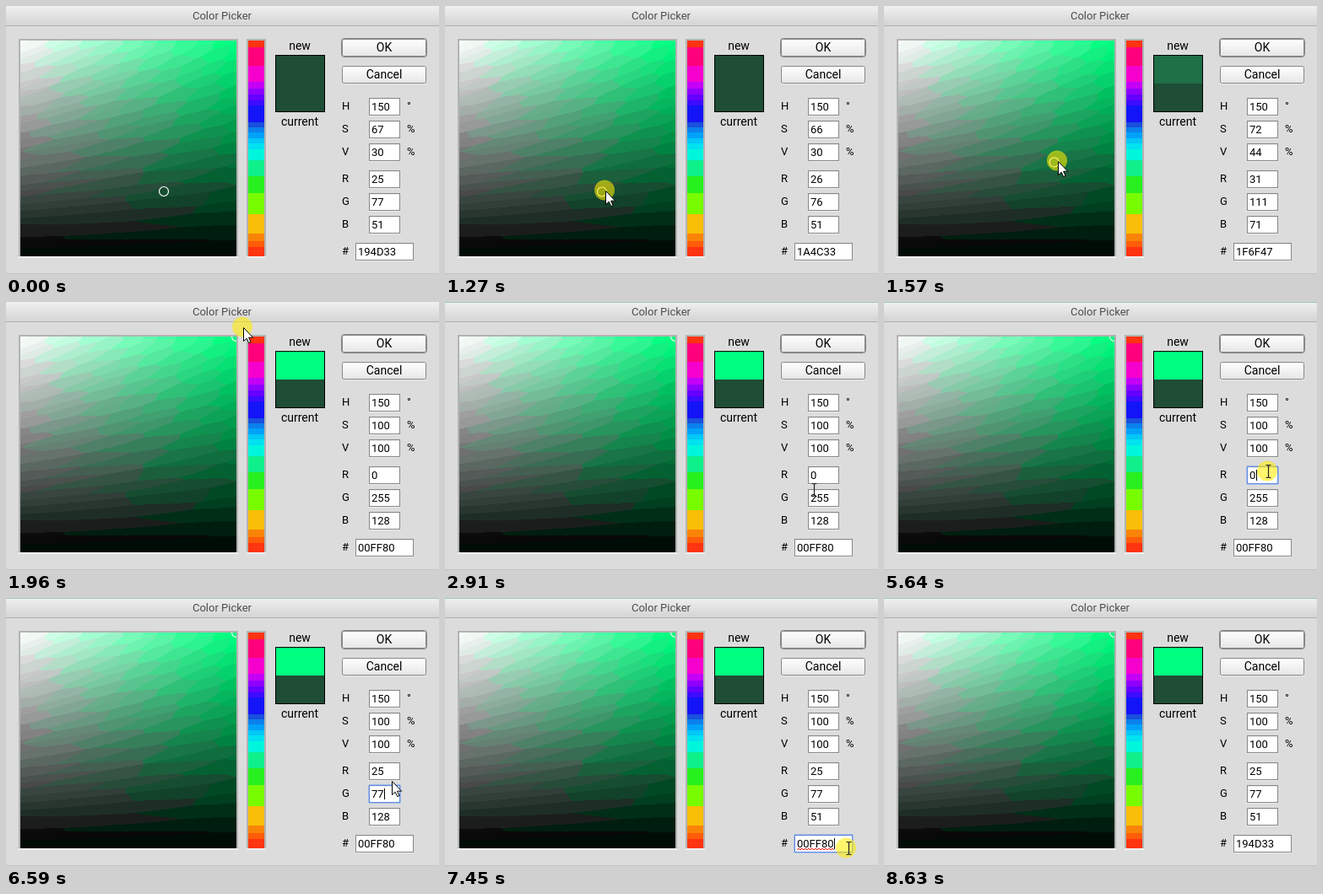
Animation, 513 px wide and 318 px high, one loop 9.48 s. Source, as an HTML page with a canvas:

```html
<!DOCTYPE html>
<html lang="en">
<head>
<meta charset="utf-8">
<title>Color Picker</title>
<style>
  html, body { margin: 0; width: 100%; height: 100%; overflow: hidden; background: #dcdcdc; }
  canvas { position: absolute; left: 17px; top: 41px; }
  svg { position: absolute; left: 0; top: 0; font: 13px Roboto, Arial, sans-serif; }
  text { white-space: pre; }
</style>
</head>
<body>
<canvas id="shade" width="256" height="256"></canvas>
<svg id="stage" width="513" height="318" viewBox="0 0 513 318">
  <defs>
    <linearGradient id="head" x2="0" y2="1"><stop stop-color="#f0f0f0"/><stop offset="1" stop-color="#d4d4d4"/></linearGradient>
    <linearGradient id="button" x2="0" y2="1"><stop stop-color="#fff"/><stop offset="1" stop-color="#e6e6e6"/></linearGradient>
    <clipPath id="area"><rect x="17" y="41" width="256" height="256"/></clipPath>
  </defs>
</svg>
<script>
const LOOP = 9480, TICK = 78.5;
const stage = document.getElementById('stage');

function add(tag, attrs, content) {
  const el = document.createElementNS('http://www.w3.org/2000/svg', tag);
  for (const key in attrs) el.setAttribute(key, attrs[key]);
  if (content) el.textContent = content;
  return stage.appendChild(el);
}
const set = (el, attrs) => { for (const key in attrs) el.setAttribute(key, attrs[key]); };
const show = (el, on) => el.setAttribute('visibility', on ? 'visible' : 'hidden');
const box = (x, y, width, height, fill, more) => add('rect', { x, y, width, height, fill, ...more });
const label = (x, y, content, more) => add('text', { x, y, ...more }, content);
const clamp = (v, lo, hi) => Math.max(lo, Math.min(hi, v));

// Hue 150 at saturation s and value v
const greenShade = (s, v) => [v * (1 - s), v, v * (1 - s / 2)].map(c => Math.round(c * 255));

// The shade area, posterised into irregular cells stretched along equal brightness
function paintShades() {
  const ctx = document.getElementById('shade').getContext('2d');
  const image = ctx.createImageData(256, 256);
  const noise = (i, j, k) => {
    const n = Math.sin(i * 127.1 + j * 311.7 + k * 74.7) * 43758.5453;
    return n - Math.floor(n);
  };
  const stepC = 0.16, stepL = 0.034;
  for (let y = 0; y < 256; y++) for (let x = 0; x < 256; x++) {
    const s = x / 255, v = 1 - y / 255;
    const c = v * s / stepC, l = v * (1 - 0.36 * s) / stepL;
    let best = Infinity, bestC, bestL;
    for (let j = Math.floor(l) - 1; j <= l + 1; j++) for (let i = Math.floor(c) - 2; i <= c + 1; i++) {
      const pc = i + 0.5 + (j & 1) / 2 + (noise(i, j, 1) - 0.5) * 0.7;
      const pl = j + 0.5 + (noise(i, j, 2) - 0.5) * 0.7;
      const d = (pc - c) ** 2 + (pl - l) ** 2;
      if (d < best) { best = d; bestC = pc; bestL = pl; }
    }
    const cellV = clamp(bestL * stepL + 0.36 * bestC * stepC, 0, 1);
    const cellS = cellV ? clamp(bestC * stepC / cellV, 0, 1) : 0;
    image.data.set([...greenShade(cellS, cellV), 255], (y * 256 + x) * 4);
  }
  ctx.putImageData(image, 0, 0);
}
paintShades();

// Window
const topEdge = box(0, 0, 513, 1, '#9cc7bd');
box(0, 0, 513, 23, 'url(#head)');
box(0, 23, 513, 1, '#b1b1b1');
stage.appendChild(topEdge);
box(0, 317, 513, 1, '#c4c4c4');
label(256, 16, 'Color Picker', { 'text-anchor': 'middle', fill: '#4d4d4d' });

function frame(x, width) {
  box(x + 1, 40, width - 2, 258, 'none', { stroke: '#b3b3b3', 'stroke-width': 2 });
  box(x, 297, width, 2, '#f0f0f0');
}
frame(15, 260);
frame(285, 23);

// Hue bands: bottom edge and colour
const hues = [
  [49, '#ff3411'], [71, '#ff007c'], [90, '#f600ce'], [98, '#c400f8'], [105, '#9000ff'],
  [112, '#6400ff'], [118, '#3c0cff'], [138, '#1414f8'], [144, '#1a50dc'], [150, '#0a80ee'],
  [157, '#00a2f8'], [163, '#00c8f8'], [170, '#00e2f0'], [183, '#00f6dc'], [202, '#10f08a'],
  [222, '#28f01e'], [247, '#78fc00'], [270, '#f8be08'], [279, '#f88408'], [286, '#ff5c0a'], [297, '#ff3411']
];
hues.reduce((y, [end, fill]) => (box(287, y, 19, end - y, fill), end), 41);

// Swatches and buttons
const middle = { 'text-anchor': 'middle', 'font-size': 14 };
label(348, 52, 'new', middle);
label(348, 142, 'current', middle);
const CURRENT = '#1f4d35';
const fresh = box(319, 58, 58, 34, CURRENT);
box(319, 92, 58, 34, CURRENT);
box(319.5, 58.5, 58, 67, 'none', { stroke: '#000' });

function button(y, content, active) {
  if (active) box(397.5, y - 1, 101, 22, 'none', { stroke: '#878787', rx: 3 });
  else box(398, y + 20.5, 100, 1, '#eaeaea');
  box(398.5, y, 99, 20, 'url(#button)', { stroke: '#878787', rx: 2 });
  label(448, y + 14.5, content, middle);
}
button(39.5, 'OK', true);
button(71.5, 'Cancel');

// Input fields
const fields = {};
function field(name, cy, unit, x = 430, width = 37) {
  const top = cy - 10, base = cy + 4.5;
  label(398, base - 1, name);
  if (unit) label(475, base - 1, unit);
  box(x, top + 20.5, width, 1, '#ececec');
  const glow = box(x - 0.5, top - 1, width + 1, 22, 'none', { stroke: '#7fa4ee', 'stroke-opacity': 0.6, rx: 1.5 });
  const rim = box(x + 0.5, top, width - 1, 20, '#fff', { stroke: '#888' });
  box(x + 1, top + 0.5, width - 2, 1, '#eee');
  const text = label(x + 3, base, '');
  const caret = box(0, cy - 6.5, 1, 13, '#000');
  fields[name] = { x, width, top, glow, rim, text, caret };
}
field('H', 119.5, '°');
field('S', 146.5, '%');
field('V', 173.5, '%');
field('R', 205.5);
field('G', 232.5);
field('B', 259.5);
field('#', 291.5, '', 414, 69);

const wave = add('path', {
  d: 'M417 299' + 'l2 -2l2 2'.repeat(11), fill: 'none', stroke: '#f02020'
});

const marker = add('circle', { r: 5.5, fill: 'none', stroke: '#fff', 'stroke-width': 1.2, 'clip-path': 'url(#area)' });
const halo = add('circle', { r: 12, fill: '#ffec00', 'fill-opacity': 0.58 });
const arrow = add('path', {
  d: 'M.5 .5V16.5L4.2 13.2L6.7 18.6L9 17.6L6.6 12.2H11.6Z', fill: '#fff', stroke: '#000', 'stroke-linejoin': 'round'
});
const beam = add('path', {
  d: 'M-3 -7.5H-1L0 -6.5L1 -7.5H3M0 -6.5V6.5M-3 7.5H-1L0 6.5L1 7.5H3', fill: 'none', stroke: '#222', 'stroke-width': 1.2
});

// Pointer path: tick, x, y
const path = [
  [1, 446, 298], [11, 197, 207], [13, 190, 218], [14, 189, 219], [16, 190, 219], [18, 187, 222],
  [25, 281, 30], [26, 284, 23], [27, 284, 23], [29, 284, 23], [39, 455, 246], [42, 463, 231],
  [43, 463, 231], [45, 455, 227], [47, 455, 227], [48, 458, 231], [49, 419, 227], [50, 419, 227],
  [52, 445, 227], [55, 455, 228], [57, 455, 228], [60, 437, 231], [62, 455, 230], [65, 455, 230],
  [69, 455, 201], [81, 455, 201], [91, 464, 276], [93, 478, 297], [97, 478, 297], [98, 479, 290],
  [100, 483, 243], [102, 483, 255], [106, 483, 255], [109, 492, 299]
];
function pointerAt(n) {
  const k = path.findIndex(p => p[0] >= n);
  if (k < 0) return path[path.length - 1].slice(1);
  if (k === 0) return path[0].slice(1);
  const [n0, x0, y0] = path[k - 1], [n1, x1, y1] = path[k];
  const u = (n - n0) / (n1 - n0), e = n1 - n0 > 5 ? u * u * (3 - 2 * u) : u;
  return [x0 + (x1 - x0) * e, y0 + (y1 - y0) * e];
}

const within = (n, from, to) => n >= from && n < to;
const hex = rgb => rgb.map(c => c.toString(16).padStart(2, '0')).join('').toUpperCase();

function focusAt(n) {
  if (within(n, 71, 82)) return 'R';
  if (within(n, 82, 86)) return 'G';
  if (within(n, 86, 95)) return 'B';
  return within(n, 95, 101) ? '#' : '';
}

function valuesAt(n, s, v) {
  const rgb = n < 14 ? [25, 77, 51] : greenShade(s, v);
  const values = {
    H: 150, S: n < 14 ? 67 : Math.round(s * 100), V: Math.round(v * 100),
    R: rgb[0], G: rgb[1], B: rgb[2], '#': hex(rgb)
  };
  const type = (name, start, step, content) => {
    if (n >= start) values[name] = content.slice(0, 1 + Math.floor((n - start) / step));
  };
  type('R', 78, 2, '25');
  type('G', 83, 1, '77');
  type('B', 87, 1, '51');
  if (n >= 99) values['#'] = '194D33';
  return { rgb, values };
}

function draw(time) {
  const n = Math.floor((time + 15) / TICK);
  const [px, py] = pointerAt(n);
  const [dragX, dragY] = n < 14 ? [191, 218.5] : pointerAt(Math.min(n, 26));
  const mx = clamp(dragX - 4, 17, 273), my = clamp(dragY + 1.5, 41, 297);
  const { rgb, values } = valuesAt(n, (mx - 17) / 256, 1 - (my - 41) / 256);

  set(marker, { cx: mx, cy: my });
  set(fresh, { fill: n < 17 ? CURRENT : `rgb(${rgb})` });
  show(topEdge, n >= 30);

  const focus = focusAt(n);
  for (const name in fields) {
    const f = fields[name], on = name === focus, content = String(values[name]);
    if (f.text.textContent !== content) f.text.textContent = content;
    set(f.rim, { stroke: on ? '#5f8be0' : '#888' });
    show(f.glow, on);
    show(f.caret, on);
    if (on) set(f.caret, { x: Math.round(f.x + 3.5 + f.text.getComputedTextLength()) });
  }
  show(wave, focus === '#');

  const visible = within(n, 1, 110);
  const overField = Object.values(fields).some(f =>
    within(px, f.x, f.x + f.width) && within(py, f.top, f.top + 20));
  const dragging = within(n, 14, 27);
  const typing = overField && !dragging;
  const pressed = dragging || within(n, 71, 76) || within(n, 95, 98);
  const x = Math.round(px), y = Math.round(py);
  show(arrow, visible && !typing);
  show(beam, visible && typing);
  show(halo, pressed);
  set(arrow, { transform: `translate(${x} ${y})` });
  set(beam, { transform: `translate(${x + 0.5} ${y})` });
  set(halo, { cx: x - (n >= 95 ? 3 : 1), cy: y - 0.5 });
}

const start = performance.now();
function loop() {
  draw((performance.now() - start) % LOOP);
  requestAnimationFrame(loop);
}
loop();
</script>
</body>
</html>
```
